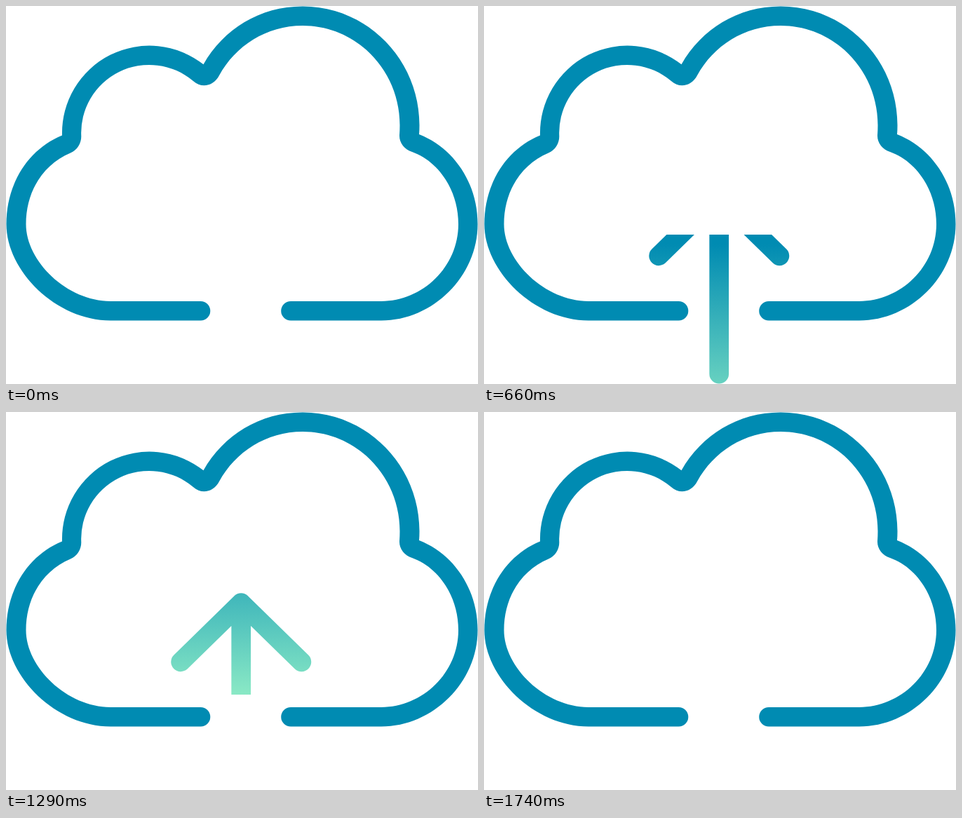
An HTML page that plays this animation: 673x539 px, repeating every 1770 ms.

```html
<!DOCTYPE html>
<html lang="en">
<head>
<meta charset="utf-8">
<title>Cloud upload</title>
<style>
  html, body { margin: 0; width: 100%; height: 100%; overflow: hidden; background: #fff; }
  svg { display: block; }
</style>
</head>
<body>
<svg width="673" height="539" viewBox="0 0 673 539">
  <defs>
    <!-- A window of colour, transparent above and below, that slides up over the arrow -->
    <linearGradient id="sweep" gradientUnits="userSpaceOnUse" x1="0" y1="0" x2="0" y2="280.33">
      <stop offset="0" stop-color="#008bb2" stop-opacity="0"/>
      <stop offset="0" stop-color="#008bb2"/>
      <stop offset=".05" stop-color="#008bb2"/>
      <stop offset="1" stop-color="#8ae9c5"/>
      <stop offset="1" stop-color="#8ae9c5" stop-opacity="0"/>
    </linearGradient>
  </defs>
  <path id="cloud" fill="#008bb2" d="
    M277.5 448.5 H149 C72 448.5 .5 378 .5 311 C.5 253 32 204 80 184.5
    A124.5 124.5 0 0 1 281.5 83.3
    C310 33 362 .5 423 .5 C515 .5 589.5 76.5 589.5 170 Q589.5 177 589 183
    C638 202 672.5 252 672.5 311 C672.5 385 609 448.5 535 448.5 H406
    a13.8 13.8 0 0 1 0 -27.6 H535
    C594 420.9 645 372 645 311 C645 264 618 222 579 208
    C568 204.5 560.5 195 561 184 Q561.5 177 561.5 170
    C561.5 92 500 28 423 28 C371 28 327 57 304 99
    C296.5 114 279 118 267 107
    A97 97 0 0 0 107.3 186 C107.3 196 101.5 205.5 92 209.5
    C53 226 28.5 264 28.5 311 C28.5 364 87 420.9 149 420.9 H277.5
    a13.8 13.8 0 0 1 0 27.6 Z"/>
  <path id="arrow" fill="none" stroke="url(#sweep)" stroke-width="27.7"
    stroke-linecap="round" stroke-linejoin="round"
    d="M335.2 524.7 V272.1 M249.1 356.3 L335.2 272.1 L421.4 356.3"/>
</svg>
<script>
  const STEP = 30, STEPS = 59, START = 538.67, TRAVEL = 560.67;
  const sweep = document.getElementById('sweep');

  function draw() {
    const step = Math.floor(performance.now() / STEP) % STEPS;
    const y = START - TRAVEL * step / (STEPS - 1);
    sweep.setAttribute('gradientTransform', `translate(0 ${y})`);
    requestAnimationFrame(draw);
  }
  draw();
</script>
</body>
</html>
```
